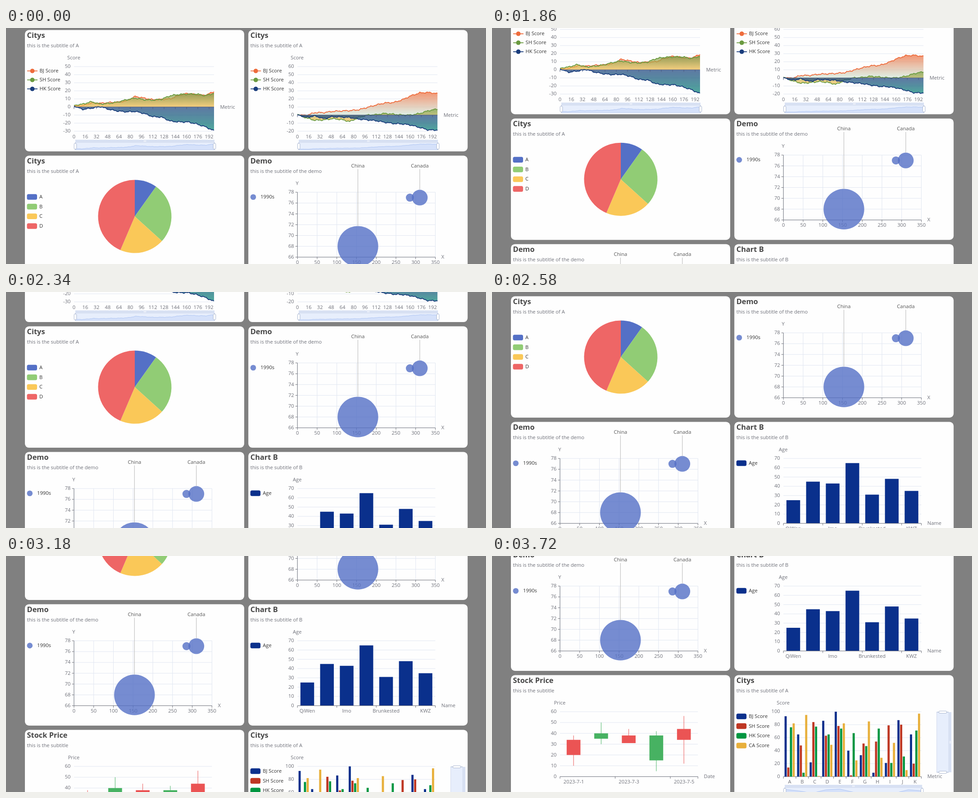
An HTML page with a canvas that plays this animation: 1066x526 px, repeating every 5160 ms.

```html
<!DOCTYPE html>
<html lang="en">
<head>
<meta charset="utf-8">
<title>Chart dashboard</title>
<style>
html, body { margin: 0; width: 100%; height: 100%; overflow: hidden; background: #808080; }
canvas { display: block; }
</style>
</head>
<body>
<canvas id="stage" width="1066" height="526"></canvas>
<script>
const ctx = document.getElementById("stage").getContext("2d");
const GREY = "#6e7079", GRID = "#e0e6f1", NAVY = "#0a308c";
const LEFT = 151, TOP = 86, BOTTOM = 230.7, RIGHT = 457.3;
const LOOP = 5160, STEP = 60, SCROLL_START = 1500;
const scrollKnots = [[0, 0], [1, 8.5], [11, 160], [18, 275], [24, 383.5], [32, 525], [37, 579]];

// ---- drawing helpers ----
function text(str, x, y, { align = "left", color = GREY, size = 11.2, weight = 400 } = {}) {
  ctx.font = `${weight} ${size}px "Open Sans", "Noto Sans", sans-serif`;
  ctx.textAlign = align;
  ctx.fillStyle = color;
  ctx.fillText(str, x, y + size * 0.36);
}

function line(x1, y1, x2, y2, color, width = 1) {
  ctx.strokeStyle = color;
  ctx.lineWidth = width;
  ctx.beginPath();
  ctx.moveTo(x1, y1);
  ctx.lineTo(x2, y2);
  ctx.stroke();
}

function disc(x, y, r, color) {
  ctx.fillStyle = color;
  ctx.beginPath();
  ctx.arc(x, y, r, 0, Math.PI * 2);
  ctx.fill();
}

function box(x, y, w, h, r, fill, stroke) {
  ctx.beginPath();
  ctx.roundRect(x, y, w, h, r);
  ctx.fillStyle = fill;
  ctx.fill();
  if (stroke) {
    ctx.strokeStyle = stroke;
    ctx.lineWidth = 1;
    ctx.stroke();
  }
}

function trace(points) {
  ctx.beginPath();
  points.forEach(([x, y]) => ctx.lineTo(x, y));
}

// ---- chart parts ----
function heading(title, subtitle) {
  text(title, 46.5, 16, { size: 16.4, weight: 700, color: "#464646" });
  text(subtitle, 46.5, 39);
}

function legend(names, colors) {
  names.forEach((name, i) => {
    const y = 96.5 + i * 21.65;
    box(46.5, y - 6.3, 22.5, 12.6, 3.5, colors[i]);
    text(name, 74, y - 0.5, { color: "#333" });
  });
}

function valueAxis(name, min, max, step, right = RIGHT, bottom = BOTTOM) {
  const toY = v => bottom - (v - min) / (max - min) * (bottom - TOP);
  for (let v = min; v <= max; v += step) {
    line(LEFT, toY(v), right, toY(v), GRID);
    text(v, 143.5, toY(v) - 0.7, { align: "right" });
  }
  text(name, 150.5, 65.7, { align: "center" });
  return toY;
}

function baseAxis(name, ticks, y = BOTTOM, right = RIGHT, nameX = 470.5, color = GREY) {
  line(LEFT, y, right, y, color);
  ticks.forEach(x => line(x, y, x, y + 4.5, color));
  text(name, nameX, y - 0.5);
}

function categoryAxis(name, labels, every) {
  const band = (RIGHT - LEFT) / labels.length;
  const ticks = [RIGHT];
  labels.forEach((label, i) => {
    if (i % every) return;
    ticks.push(LEFT + i * band);
    text(label, LEFT + (i + 0.5) * band, 242, { align: "center" });
  });
  baseAxis(name, ticks);
  return band;
}

function zoomSlider(x1, x2, values) {
  const w = x2 - x1, peak = Math.max(...values);
  box(x1, 249, w, 6, 0, "#d8e1f3");
  box(x1, 255, w, 17, 0, "#e7eefc", "#d2dbee");
  const shadow = values.map((v, i) =>
    [x1 + i / (values.length - 1) * w, 270 - Math.max(0, v) / peak * 11.5]);
  trace(shadow);
  ctx.strokeStyle = "#a9c1f2";
  ctx.lineWidth = 0.9;
  ctx.stroke();
  ctx.lineTo(x2, 272);
  ctx.lineTo(x1, 272);
  ctx.fillStyle = "rgba(135,165,235,.18)";
  ctx.fill();
  for (let i = -1; i <= 1; i++) line(x1 + w / 2 + i * 2, 250.5, x1 + w / 2 + i * 2, 253.5, "#fff");
  for (const x of [x1, x2]) {
    line(x, 255, x, 272, "#acb8d1");
    box(x - 2.8, 257.2, 5.6, 12.6, 1.5, "#fff", "#acb8d1");
  }
}

function verticalSlider() {
  box(518, 87, 6, 134, 0, "#d8e1f3");
  box(491.5, 87, 26.5, 134, 0, "#e7eefc", "#d2dbee");
  for (let i = -1; i <= 1; i++) line(520, 154 + i * 2, 523, 154 + i * 2, "#fff");
  for (const y of [87, 221]) {
    line(491.5, y, 518, y, "#acb8d1");
    box(496.5, y - 2.5, 17, 5, 1.5, "#fff", "#acb8d1");
  }
}

// ---- charts ----
const lineStyles = [
  ["BJ Score", "#ee6c3c", "rgba(238,108,60,.72)", "rgba(205,236,222,.65)"],
  ["SH Score", "#6a9a40", "rgba(106,154,64,.65)", "rgba(255,190,80,.7)"],
  ["HK Score", "#1a3d7c", "rgba(26,63,125,.7)", "rgba(40,150,135,.82)"]
];

// 200 samples along the given evenly spaced levels, with a small ripple
function wander(levels, seed) {
  return Array.from({ length: 200 }, (_, i) => {
    const p = i / 199 * (levels.length - 1);
    const k = Math.min(levels.length - 2, Math.floor(p));
    const ripple = 0.5 * Math.sin(i * 0.53 + seed) + 0.35 * Math.sin(i * 1.27 + 2 * seed) + 0.25 * Math.sin(i * 2.7 + seed);
    return levels[k] + (levels[k + 1] - levels[k]) * (p - k) + ripple * Math.min(1, i / 8);
  });
}

function areaChart(min, max, levels) {
  const series = levels.map((l, i) => wander(l, i * 2 + max));
  return () => {
    const right = 462, dx = 1.5628;
    heading("Citys", "this is the subtitle of A");
    lineStyles.forEach(([name, color], i) => {
      const y = 95.7 + i * 20;
      line(47, y, 70, y, color, 1.8);
      disc(58.5, y, 5, color);
      text(name, 74.5, y - 0.5, { color: "#333" });
    });
    const toY = valueAxis("Score", min, max, 10, right, 230);
    const zero = toY(0), ticks = [];
    for (let i = 0; i < 200; i += 16) {
      ticks.push(LEFT + i * dx);
      text(i, LEFT + i * dx, 241.7, { align: "center" });
    }
    const paths = series.map(data => data.map((v, i) => [LEFT + i * dx, toY(v)]));
    const stroke = i => {
      trace(paths[i]);
      ctx.strokeStyle = lineStyles[i][1];
      ctx.lineWidth = 1.8;
      ctx.lineJoin = "round";
      ctx.stroke();
    };
    paths.forEach((points, i) => {
      const ys = points.map(p => p[1]);
      const shade = ctx.createLinearGradient(0, Math.min(zero, ...ys), 0, Math.max(zero, ...ys));
      shade.addColorStop(0, lineStyles[i][2]);
      shade.addColorStop(1, lineStyles[i][3]);
      trace([[LEFT, zero], ...points, [right, zero]]);
      ctx.fillStyle = shade;
      ctx.fill();
      if (i < 2) stroke(i);
    });
    baseAxis("Metric", ticks, zero, right, 475.5, "#4d5a7d");
    stroke(2);
    zoomSlider(154, 463, series[0]);
  };
}

function pieChart() {
  const colors = ["#5470c6", "#91cc75", "#fac858", "#ee6666"];
  const edges = [0, 35.4, 132.3, 203.1, 360];
  heading("Citys", "this is the subtitle of A");
  legend(["A", "B", "C", "D"], colors);
  colors.forEach((color, i) => {
    const [a, b] = [edges[i], edges[i + 1]].map(d => (d - 90) * Math.PI / 180);
    ctx.fillStyle = color;
    ctx.beginPath();
    ctx.moveTo(286, 140);
    ctx.arc(286, 140, 81.5, a, b);
    ctx.fill();
  });
}

function bubbleChart() {
  const blue = "rgba(84,112,198,.8)";
  heading("Demo", "this is the subtitle of the demo");
  disc(52.8, 96.7, 6.3, blue);
  text("1990s", 69, 96, { color: "#333" });
  const toY = valueAxis("Y", 66, 78, 2), ticks = [];
  for (let i = 0; i <= 7; i++) {
    const x = LEFT + i * 43.76;
    ticks.push(x);
    line(x, TOP, x, BOTTOM, GRID);
    text(i * 50, x, 242, { align: "center" });
  }
  line(LEFT, TOP, LEFT, BOTTOM, GREY);
  for (let v = 66; v <= 78; v += 2) line(LEFT - 4.5, toY(v), LEFT, toY(v), GREY);
  baseAxis("X", ticks);
  for (const [x, v, r, name] of [[285.3, 68, 45.2, "China"], [400.8, 77, 9], [422.7, 77, 17.5, "Canada"]]) {
    disc(x, toY(v), r, blue);
    if (!name) continue;
    line(x, 34.5, x, toY(v) - r, "#bbb", 1.1);
    text(name, x, 27.2, { align: "center", color: "#555" });
  }
}

function barChart() {
  const labels = ["QiWen", "", "Imo", "", "Brunkested", "", "KWZ"];
  heading("Chart B", "this is the subtitle of B");
  legend(["Age"], [NAVY]);
  const toY = valueAxis("Age", 0, 70, 10);
  const band = (RIGHT - LEFT) / labels.length;
  [25, 45, 43, 65, 31, 48, 35].forEach((v, i) => {
    ctx.fillStyle = NAVY;
    ctx.fillRect(LEFT + (i + 0.5) * band - 15.2, toY(v), 30.4, BOTTOM - toY(v));
  });
  categoryAxis("Name", labels, 2);
}

function candleChart() {
  heading("Stock Price", "this is the subtitle");
  const toY = valueAxis("Price", 0, 60, 10);
  const band = categoryAxis("Date", [1, 2, 3, 4, 5].map(d => "2023-7-" + d), 2);
  const red = "#eb5454", green = "#47b262";
  [[34, 20, 38, 10, red], [40, 35, 50, 30, green], [38, 31, 44, 31, red],
   [38, 15, 42, 5, green], [44, 34, 56, 12, red]].forEach(([top, low, high, min, color], i) => {
    const x = LEFT + (i + 0.5) * band - 0.5;
    line(x, toY(high), x, toY(min), color);
    box(x - 15.3, toY(top), 30.6, toY(low) - toY(top), 0, color);
  });
}

function groupedChart() {
  const colors = [NAVY, "#be3723", "#009641", "#e8b03c"];
  const series = [
    [93, 65, 22, 86, 100, 40, 33, 6, 21, 87, 65],
    [14, 48, 84, 63, 78, 2, 51, 54, 79, 80, 20],
    [76, 6, 77, 65, 74, 67, 47, 74, 21, 31, 71],
    [82, 95, 1, 49, 82, 25, 85, 29, 52, 10, 97]
  ];
  heading("Citys", "this is the subtitle of A");
  legend(["BJ Score", "SH Score", "HK Score", "CA Score"], colors);
  const toY = valueAxis("Score", 0, 100, 20);
  const band = categoryAxis("Metric", [..."ABCDEFGHIJK"], 1);
  series.forEach((data, s) => data.forEach((v, i) => {
    ctx.fillStyle = colors[s];
    ctx.fillRect(LEFT + i * band + 2.5 + s * 5.95, toY(v), 4.8, BOTTOM - toY(v));
  }));
  zoomSlider(154, 459, series[0]);
  verticalSlider();
}

const cards = [
  areaChart(-30, 50, [
    [1.5, 1.5, 5, 4.5, 5.5, 6, 7.5, 13, 11, 9, 9.5, 10, 14.5, 17, 15, 14.5, 19],
    [2, 3.5, 6.5, 3.5, 4.5, 6, 9, 11, 9, 8.5, 9.5, 14, 15.5, 16, 16, 14, 17],
    [1, -3, -1.5, 0.5, -3, -5, -6, -5.5, -8, -12, -12.5, -17.5, -18.5, -18.5, -21, -24.5, -29.5]
  ]),
  areaChart(-20, 60, [
    [0.5, -0.5, 3, 3, 4.5, 5, 5.5, 6.5, 9.5, 12.5, 15, 15.5, 19, 24, 27.5, 28, 26.5],
    [1, -3.5, -6.5, -6, -4.5, -5.5, -8, -3, 0, 0.5, 2, 1, 0, 0, 2, 5.5, 7.5],
    [0.5, -3, -1, -4.5, -2, -2.5, -3, -5, -6, -7, -9, -10.5, -11, -12.5, -15.5, -18.5, -18.5]
  ]),
  pieChart, bubbleChart, bubbleChart, barChart, candleChart, groupedChart
];

// ---- scrolling: smooth curve through the knots, sampled in 60 ms steps ----
function scrollAt(time) {
  const n = Math.max(0, Math.min(37, Math.floor((time - SCROLL_START) / STEP)));
  const k = Math.max(0, scrollKnots.findIndex(([x]) => x >= n) - 1);
  const slope = i => {
    const [x1, y1] = scrollKnots[Math.max(0, i - 1)];
    const [x2, y2] = scrollKnots[Math.min(scrollKnots.length - 1, i + 1)];
    return i === scrollKnots.length - 1 ? 4 : (y2 - y1) / (x2 - x1);
  };
  const [x0, y0] = scrollKnots[k], [x1, y1] = scrollKnots[k + 1];
  const h = x1 - x0, u = (n - x0) / h, v = 1 - u;
  return v * v * (1 + 2 * u) * y0 + u * u * (1 + 2 * v) * y1
    + h * u * v * (v * slope(k) - u * slope(k + 1));
}

function render(time) {
  const scroll = scrollAt(time % LOOP);
  ctx.fillStyle = "#808080";
  ctx.fillRect(0, 0, 1066, 526);
  cards.forEach((draw, i) => {
    const y = Math.floor(i / 2) * 280 - scroll;
    if (y > 526 || y < -280) return;
    ctx.save();
    ctx.translate(i % 2 * 496.2, y);
    box(42, 4.5, 487, 270.5, 9, "#fefefe");
    ctx.clip();
    draw();
    ctx.restore();
  });
}

const start = performance.now();
function tick() {
  render(performance.now() - start);
  requestAnimationFrame(tick);
}
tick();
</script>
</body>
</html>
```
